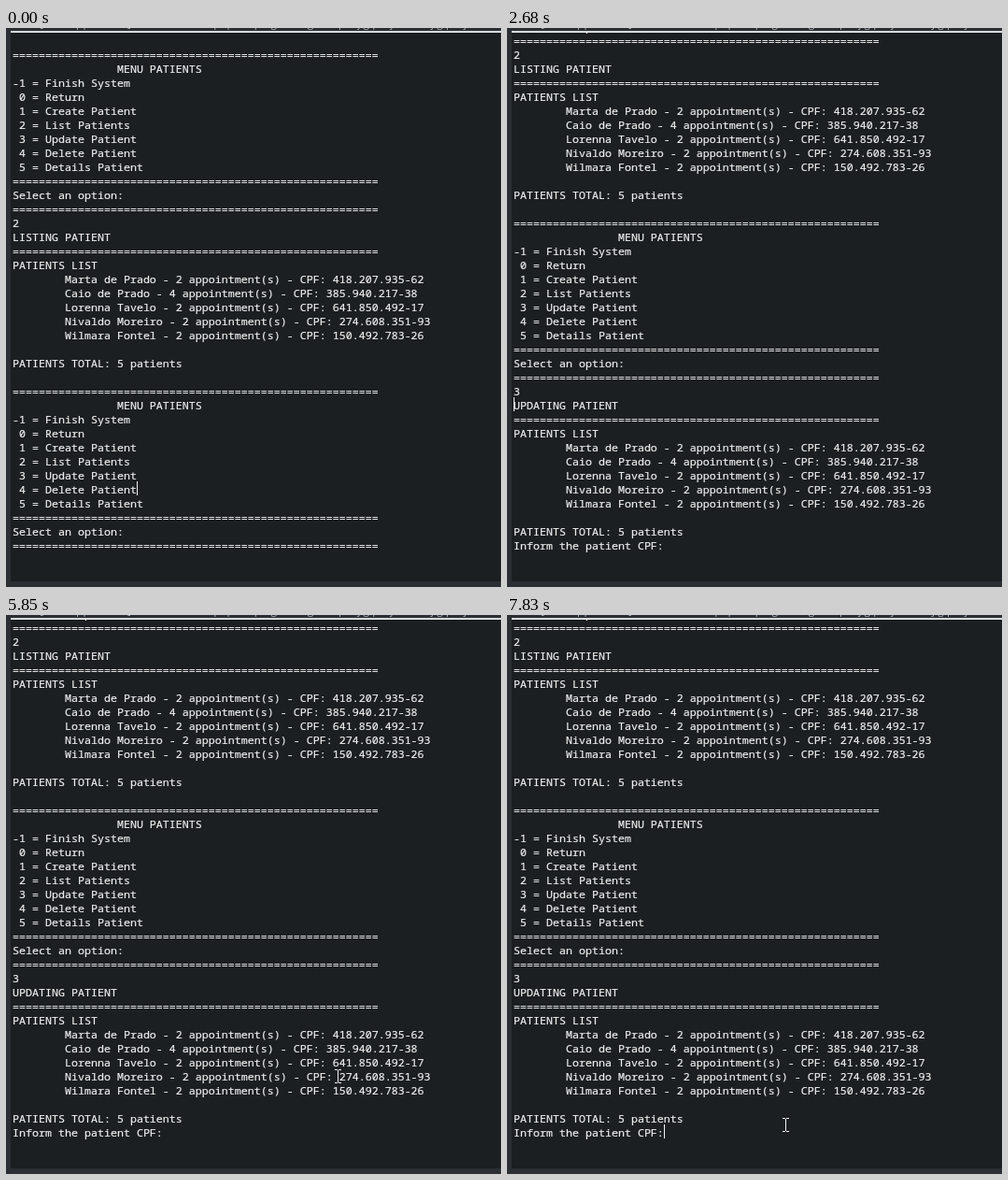
Recreate the animation shown at these times as an HTML page. Size 530 by 598 pixels, loop 8000 ms.

```html
<!DOCTYPE html>
<html lang="en">
<head>
<meta charset="utf-8">
<title>Patient console</title>
<style>
  html, body { margin: 0; width: 100%; height: 100%; overflow: hidden; background: #2b2f33; }
  #stage { position: relative; width: 530px; height: 598px; overflow: hidden; background: #2b2f33; }
  #stage * { position: absolute; }

  #tab {
    left: 36px; top: -14px; white-space: pre; color: #a9adb6;
    font: 12px/17px "Open Sans", sans-serif;
  }
  #rule { left: 5px; top: 3px; width: 525px; height: 2px; background: linear-gradient(#c4c6c8 50%, #f0f0f0 50%); }
  #console { left: 5px; top: 5px; width: 525px; height: 587px; overflow: hidden; background: #1b1f22; }

  pre {
    left: 0; margin: 0; color: #eee;
    font: 11.667px/15px "Noto Sans Mono", "DejaVu Sans Mono", monospace;
    font-variant-ligatures: none; -webkit-text-stroke: .2px;
  }
  #log, #typed, #reply, #caret, #mark, #mouse { animation: 8s step-end infinite; }
  #log { left: 2px; top: 1px; animation-name: scroll; }
  #start { top: 0; }
  #typed { top: 555px; animation-name: typed; }
  #reply { top: 570px; animation-name: reply; }

  /* caret, selection and pointer use stage coordinates */
  #caret { left: 0; top: 0; width: 1px; height: 15px; background: #f4f4f4; animation-name: caret; }
  #mark { left: 357px; top: 485px; height: 15px; overflow: hidden; background: #6787f2; animation-name: mark; }
  #mark pre { top: 1px; color: #fff; }
  #mouse { left: -4px; top: -8px; width: 7px; height: 15px; overflow: visible; animation-name: mouse; }

  @keyframes scroll { 0% { translate: 0 0; } 33.5%, 100% { translate: 0 -180px; } }
  @keyframes typed { 0% { visibility: hidden; } 28.125%, 100% { visibility: visible; } }
  @keyframes reply { 0% { visibility: hidden; } 33.5%, 100% { visibility: visible; } }

  @keyframes caret {
    0%      { translate: 140px 485px; opacity: 1; }
    5%      { translate: 140px 485px; opacity: 0; }
    10.375% { translate: 140px 485px; opacity: 1; }
    17.625% { translate: 140px 485px; opacity: 0; }
    24.75%  { translate: 140px 485px; opacity: 1; }
    28.125% { translate: 14px 560px; opacity: 1; }
    33.5%   { translate: 7px 395px; opacity: 1; }
    39.25%  { translate: 7px 395px; opacity: 0; }
    46.625% { translate: 7px 395px; opacity: 1; }
    53.625% { translate: 7px 395px; opacity: 0; }
    60.75%  { translate: 7px 395px; opacity: 1; }
    67.875% { translate: 7px 395px; opacity: 0; }
    74.75%  { translate: 7px 395px; opacity: 1; }
    78.375% { translate: 7px 395px; opacity: 0; }
    97.875%, 100% { translate: 168px 545px; opacity: 1; }
  }
  @keyframes mark {
    0%      { width: 0; }
    78.375% { width: 7px; }
    80.25%  { width: 21px; }
    82.125% { width: 63px; }
    84%     { width: 98px; }
    97.875%, 100% { width: 0; }
  }
  @keyframes mouse {
    0%      { translate: 466px 485px; opacity: 0; }
    46.625% { translate: 466px 485px; opacity: 1; }
    48.375% { translate: 404px 505px; }
    50.125% { translate: 348px 515px; }
    51.875% { translate: 324px 517px; }
    53.625% { translate: 321px 517px; }
    55.375% { translate: 326px 515px; }
    57.125% { translate: 334px 513px; }
    58.875% { translate: 341px 511px; }
    60.75%  { translate: 346px 510px; }
    62.625% { translate: 348px 509px; }
    64.5%   { translate: 349px 509px; }
    66.375% { translate: 351px 506px; }
    67.875% { translate: 353px 502px; }
    69.625% { translate: 355px 498px; }
    71.375% { translate: 356px 495px; }
    73.125% { translate: 356px 494px; }
    76.625% { translate: 357px 493px; }
    78.375% { translate: 367px 493px; }
    80.25%  { translate: 385px 494px; }
    82.125% { translate: 426px 492px; }
    84%     { translate: 457px 491px; opacity: 1; }
    91.375% { translate: 438px 499px; }
    93%     { translate: 382px 520px; }
    94.625% { translate: 324px 540px; }
    96.25%  { translate: 301px 546px; }
    97.875%, 100% { translate: 299px 546px; opacity: 1; }
  }
</style>
</head>
<body>
<div id="stage">
  <div id="tab">[Task Application] C:\Files\Local\.q2\pool\plugins\org.sample.jig.project.full.jig.project</div>
  <div id="rule"></div>
  <div id="console">
    <div id="log">
      <pre id="start"></pre>
      <pre id="typed">3</pre>
      <pre id="reply"></pre>
    </div>
  </div>
  <div id="mark"><pre id="picked"></pre></div>
  <div id="caret"></div>
  <svg id="mouse" viewBox="0 0 7 15" shape-rendering="crispEdges">
    <path d="M0 0h3v1h1v-1h3v1h-3v13h3v1h-3v-1h-1v1h-3v-1h3v-13h-3z" fill="#f2f2f2"/>
  </svg>
</div>
<script>
  const bar = "=".repeat(56);
  const patients = [
    ["Marta de Prado", 2, "418.207.935-62"],
    ["Caio de Prado", 4, "385.940.217-38"],
    ["Lorenna Tavelo", 2, "641.850.492-17"],
    ["Nivaldo Moreiro", 2, "274.608.351-93"],
    ["Wilmara Fontel", 2, "150.492.783-26"]
  ];
  const menu = [
    "", bar, " ".repeat(16) + "MENU PATIENTS",
    "-1 = Finish System", " 0 = Return", " 1 = Create Patient", " 2 = List Patients",
    " 3 = Update Patient", " 4 = Delete Patient", " 5 = Details Patient",
    bar, "Select an option:", bar
  ];
  const list = title => [
    title, bar, "PATIENTS LIST",
    ...patients.map(([name, visits, cpf]) =>
      " ".repeat(8) + `${name} - ${visits} appointment(s) - CPF: ${cpf}`),
    "", `PATIENTS TOTAL: ${patients.length} patients`
  ];
  const show = (id, lines) => {
    document.getElementById(id).textContent = lines.join("\n");
  };

  show("start", [...menu, "2", ...list("LISTING PATIENT"), ...menu]);
  show("reply", [...list("UPDATING PATIENT"), "Inform the patient CPF:"]);
  show("picked", [patients[3][2]]);
</script>
</body>
</html>
```
